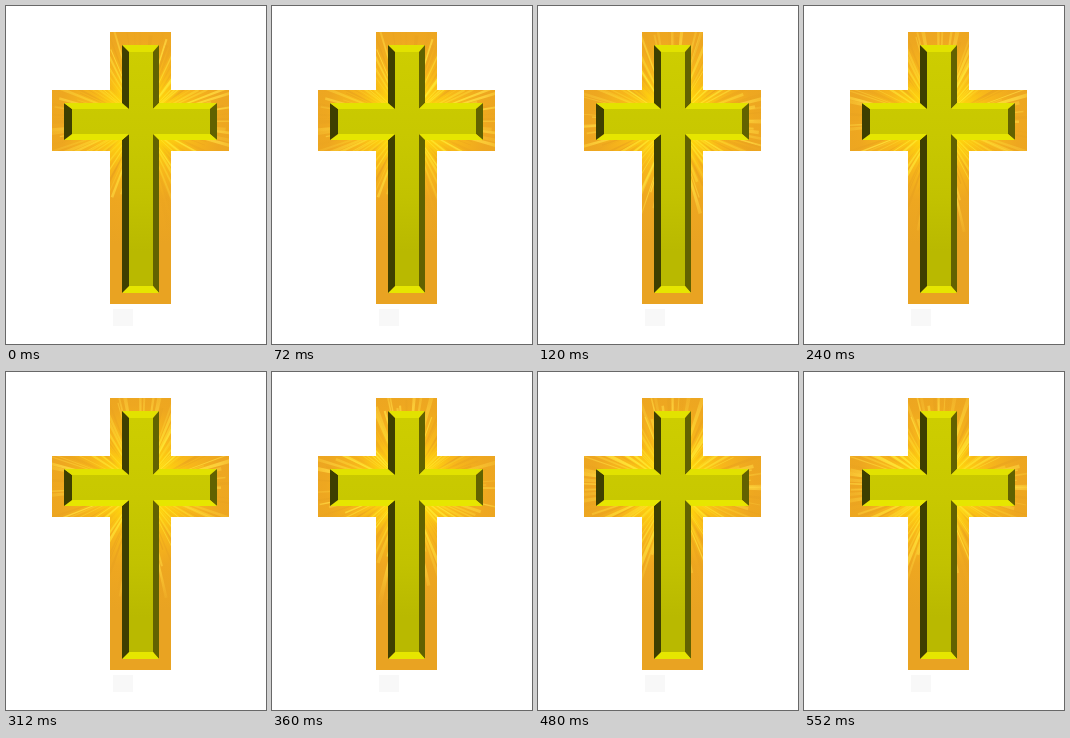
Recreate the animation shown at these times as an HTML page with a canvas. Size 260x338 px, loop 600 ms.

```html
<!DOCTYPE html>
<html lang="en">
<head>
<meta charset="utf-8">
<title>Shining cross</title>
<style>
  html, body { margin: 0; width: 100%; height: 100%; overflow: hidden; background: #fff; }
  canvas { display: block; }
</style>
</head>
<body>
<canvas id="stage" width="260" height="338"></canvas>
<script>
const ctx = document.getElementById('stage').getContext('2d');
const CX = 135, CY = 115, STEP = 120, STEPS = 5, RAYS = 110, TAU = Math.PI * 2;

// Corners clockwise from the top left, for a cross given by its bar edges.
const cross = ({ l, r, t, b, L, R, T, B }) => [
  [l, t], [r, t], [r, T], [R, T], [R, B], [r, B],
  [r, b], [l, b], [l, B], [L, B], [L, T], [l, T]
];
const plate = cross({ l: 104, r: 165, t: 26, b: 298, L: 46, R: 223, T: 84, B: 145 });
const rim = cross({ l: 116, r: 153, t: 39, b: 287, L: 58, R: 211, T: 97, B: 134 });
const face = cross({ l: 123, r: 147, t: 46, b: 280, L: 66, R: 204, T: 103, B: 128 });

function trace(points) {
  ctx.beginPath();
  points.forEach(([x, y]) => ctx.lineTo(x, y));
  ctx.closePath();
}
function fill(points, color) {
  trace(points);
  ctx.fillStyle = color;
  ctx.fill();
}
function addStops(gradient, stops) {
  stops.forEach(([at, color]) => gradient.addColorStop(at, color));
  return gradient;
}
const glow = (radius, stops) =>
  addStops(ctx.createRadialGradient(CX, CY, 0, CX, CY, radius), stops);

const base = glow(125, [[0, '#ffe010'], [0.22, '#ffd60c'], [0.42, '#f8b81a'], [0.65, '#eea720'], [1, '#e9a322']]);
const shine = glow(125, [[0, '#fff030'], [0.4, '#ffea38'], [0.65, '#ffd840'], [1, 'rgba(250,190,45,0)']]);
const shadow = glow(110, [[0, 'rgba(233,163,34,0)'], [0.25, 'rgba(233,163,34,0)'], [0.5, '#eaa31c'], [1, '#e9a322']]);
const gold = addStops(ctx.createLinearGradient(0, 46, 0, 280),
  [[0, '#cdcd00'], [0.35, '#c8c800'], [0.62, '#c2c200'], [0.85, '#b9b900'], [1, '#b9b900']]);

// Bevel shade for each edge: top, right, bottom or left facing.
const shades = ['#e2e200', '#626200', '#e6e600', '#3e3f00'];
const facing = [0, 1, 0, 1, 2, 1, 2, 3, 2, 3, 0, 3];

// Every step throws a fresh, repeatable burst of rays.
function drawRays(step) {
  let seed = 4100 + step * 7919;
  const random = () => (seed = (seed * 16807) % 2147483647) / 2147483647;
  ctx.save();
  trace(plate);
  ctx.clip();
  for (let i = 0; i < RAYS; i++) {
    const angle = (i + random()) / RAYS * TAU;
    const width = 0.005 + random() * 0.018;
    const reach = 65 + random() * 58;
    const tip = a => [CX + Math.cos(a) * reach, CY + Math.sin(a) * reach];
    ctx.globalAlpha = 0.25 + random() * 0.55;
    fill([[CX, CY], tip(angle - width), tip(angle + width)], random() < 0.6 ? shine : shadow);
  }
  ctx.restore();
}

function draw(step) {
  ctx.fillStyle = '#fff';
  ctx.fillRect(0, 0, 260, 338);
  ctx.fillStyle = '#f8f8f8';
  ctx.fillRect(107, 303, 20, 17);
  fill(plate, base);
  drawRays(step);
  rim.forEach((p, i) => {
    const j = (i + 1) % rim.length;
    fill([p, rim[j], face[j], face[i]], shades[facing[i]]);
  });
  fill(face, gold);
}

function tick() {
  draw(Math.floor(performance.now() / STEP) % STEPS);
  requestAnimationFrame(tick);
}
tick();
</script>
</body>
</html>
```
